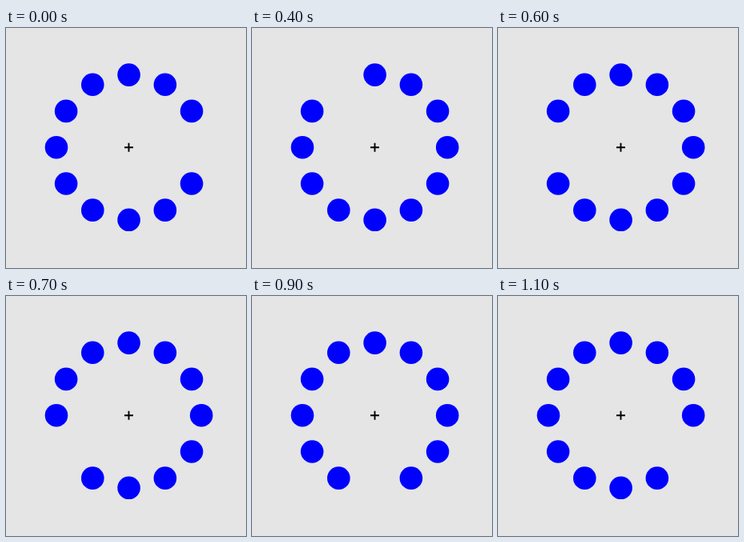
Animation, 300 px wide and 300 px high, one loop 1200 ms. Source, as an HTML page:

```html
<!DOCTYPE html>
<html lang="en">
<head>
<meta charset="utf-8">
<title>Ring of dots</title>
<style>
  html, body { margin: 0; width: 100%; height: 100%; overflow: hidden; background: #e5e5e5; }
  svg { display: block; width: 100vw; height: 100vh; }
</style>
</head>
<body>
<svg viewBox="0 0 300 300">
  <rect width="300" height="300" fill="#e5e5e5"/>
  <g id="ring" fill="#00f"></g>
  <path d="M148 149.2h11M153.5 143.7v11" stroke="#000" stroke-width="1.9" fill="none"/>
</svg>
<script>
  const COUNT = 12, STEP_MS = 100;
  const CENTER = { x: 153.6, y: 149.2 }, RING_RADIUS = 90.6, DOT_RADIUS = 14.3;
  const ring = document.getElementById('ring');

  // Dots run counter-clockwise from the right.
  const dots = Array.from({ length: COUNT }, (_, i) => {
    const angle = i * 2 * Math.PI / COUNT;
    const dot = document.createElementNS('http://www.w3.org/2000/svg', 'circle');
    dot.setAttribute('cx', CENTER.x + RING_RADIUS * Math.cos(angle));
    dot.setAttribute('cy', CENTER.y - RING_RADIUS * Math.sin(angle));
    dot.setAttribute('r', DOT_RADIUS);
    return ring.appendChild(dot);
  });

  function render(time) {
    const gap = Math.floor(time / STEP_MS) % COUNT;
    dots.forEach((dot, i) => dot.setAttribute('visibility', i === gap ? 'hidden' : 'visible'));
  }

  const start = performance.now();
  function tick() {
    render(performance.now() - start);
    requestAnimationFrame(tick);
  }
  tick();
</script>
</body>
</html>
```
